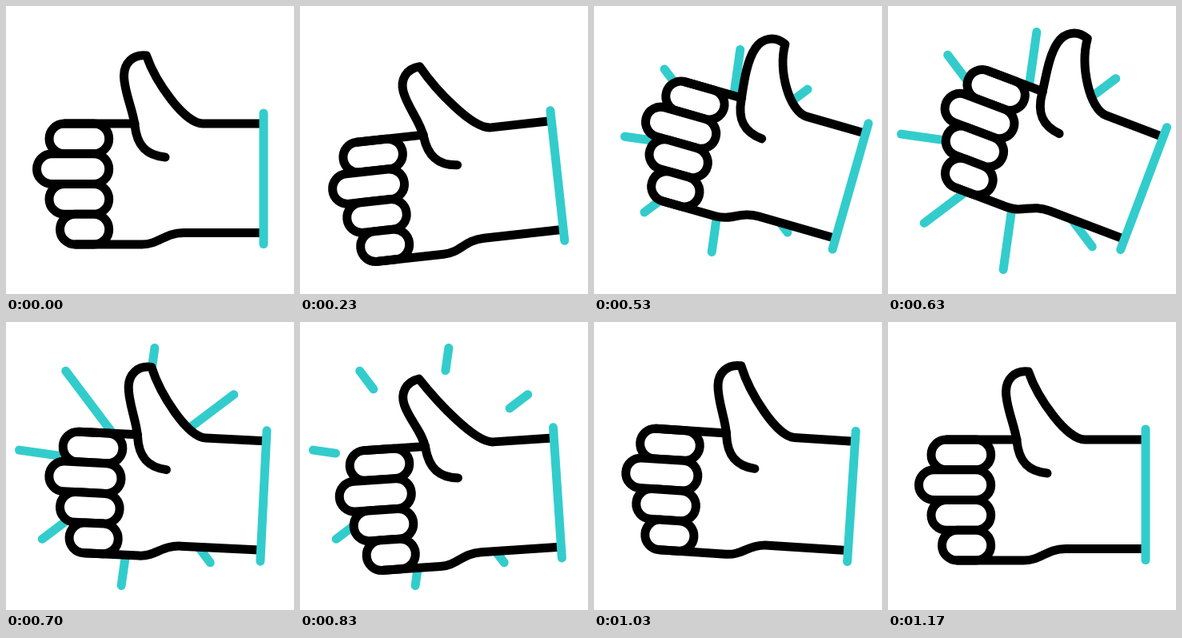
Write an HTML page with a canvas that moves like this. It is 360 px wide and 360 px high and loops after 1.67 s.

```html
<!DOCTYPE html>
<html>
<head>
<meta charset="utf-8">
<title>Thumbs up</title>
<style>
html, body { margin: 0; height: 100%; overflow: hidden; background: #fff; }
canvas { display: block; width: 360px; height: 360px; }
</style>
</head>
<body>
<canvas id="stage" width="360" height="360"></canvas>
<script>
const LOOP = 1670, BLACK = '#000', TEAL = '#33cccc';
const ctx = document.getElementById('stage').getContext('2d');

// Each track is a list of [time, value], eased in and out between keys.
const tilt = [[100, 0], [355, -12], [604, 22.8], [763, -7], [960, 5], [1170, 0]];
const bend = [[100, 0], [360, -17.5], [560, 20], [810, -15.5], [1090, 0]];
const rayTip = [[305, 0], [607, 150]];
const rayTail = [[617, 0], [917, 150]];
const grip = i => [[124 + 33 * i, 0], [424 + 33 * i, 14.5], [740, 14.5], [1020, 0]];

const FINGER_LEFT = [54, 38.5, 54, 67.5];
const TOP = 147, BOTTOM = 298, STEP = (BOTTOM - TOP) / 4, WRIST = 283.5;
const PIVOT = [287, 215.5], KNUCKLE = [168, 125];

const rad = deg => deg * Math.PI / 180;

function at(track, t) {
  const next = track.findIndex(key => key[0] > t);
  if (next < 0) return track[track.length - 1][1];
  if (next === 0) return track[0][1];
  const [t0, a] = track[next - 1], [t1, b] = track[next];
  return a + (b - a) * (1 - Math.cos(Math.PI * (t - t0) / (t1 - t0))) / 2;
}

function stroke(color, path) {
  ctx.strokeStyle = color;
  ctx.beginPath();
  path();
  ctx.stroke();
}

function line(color, x0, y0, x1, y1) {
  stroke(color, () => { ctx.moveTo(x0, y0); ctx.lineTo(x1, y1); });
}

function rays(t) {
  const tip = at(rayTip, t), tail = at(rayTail, t);
  if (tip - tail < 1) return;
  for (let i = 0; i < 8; i++) {
    const a = rad(8 + 45 * i), c = Math.cos(a), s = Math.sin(a);
    line(TEAL, 165 + c * tail, 181 + s * tail, 165 + c * tip, 181 + s * tip);
  }
}

// Turns thumb points, given as x, y pairs, around the knuckle.
function bent(angle, ...p) {
  const c = Math.cos(angle), s = Math.sin(angle), out = [];
  for (let i = 0; i < p.length; i += 2) {
    const x = p[i] - KNUCKLE[0], y = p[i + 1] - KNUCKLE[1];
    out.push(KNUCKLE[0] + c * x - s * y, KNUCKLE[1] + s * x + c * y);
  }
  return out;
}

// The upper thumb bends; its root stays with the hand.
function thumb(angle) {
  ctx.moveTo(320, TOP);
  ctx.lineTo(246, TOP);
  ctx.bezierCurveTo(223, TOP, ...bent(angle, 187, 95, 175.5, 62));
  ctx.bezierCurveTo(...bent(angle, 158, 60, 147.5, 72, 147.5, 87));
  ctx.bezierCurveTo(...bent(angle, 147.5, 107), 158.5, 129, 161, 149);
}

function wrist() {
  ctx.lineTo(170, BOTTOM);
  ctx.bezierCurveTo(191, BOTTOM, 198, WRIST, 222, WRIST);
  ctx.lineTo(320, WRIST);
}

function hand(t) {
  const angle = rad(at(bend, t));
  const shift = FINGER_LEFT.map((_, i) => at(grip(i), t));
  ctx.save();
  ctx.translate(...PIVOT);
  ctx.rotate(rad(at(tilt, t)));
  ctx.translate(-PIVOT[0], -PIVOT[1]);
  ctx.fillStyle = '#fff';

  ctx.beginPath();
  thumb(angle);
  ctx.lineTo(100, TOP);
  ctx.lineTo(100, BOTTOM);
  wrist();
  ctx.fill();

  FINGER_LEFT.forEach((left, i) => stroke(BLACK, () => {
    ctx.roundRect(left + shift[i], TOP + STEP * i, 128.7 - left, STEP, STEP / 2);
    ctx.fill();
  }));

  line(BLACK, 73 + shift[0], TOP, 161, TOP);
  stroke(BLACK, () => {
    thumb(angle);
    ctx.bezierCurveTo(163.5, 174, 175, 187, 199, 189);
  });
  stroke(BLACK, () => {
    ctx.moveTo(87 + shift[3], BOTTOM);
    wrist();
  });
  line(TEAL, 322, 134, 322, 297.5);
  ctx.restore();
}

function draw() {
  const t = performance.now() % LOOP;
  ctx.clearRect(0, 0, 360, 360);
  ctx.lineWidth = 11;
  ctx.lineCap = ctx.lineJoin = 'round';
  rays(t);
  hand(t);
  requestAnimationFrame(draw);
}
draw();
</script>
</body>
</html>
```
